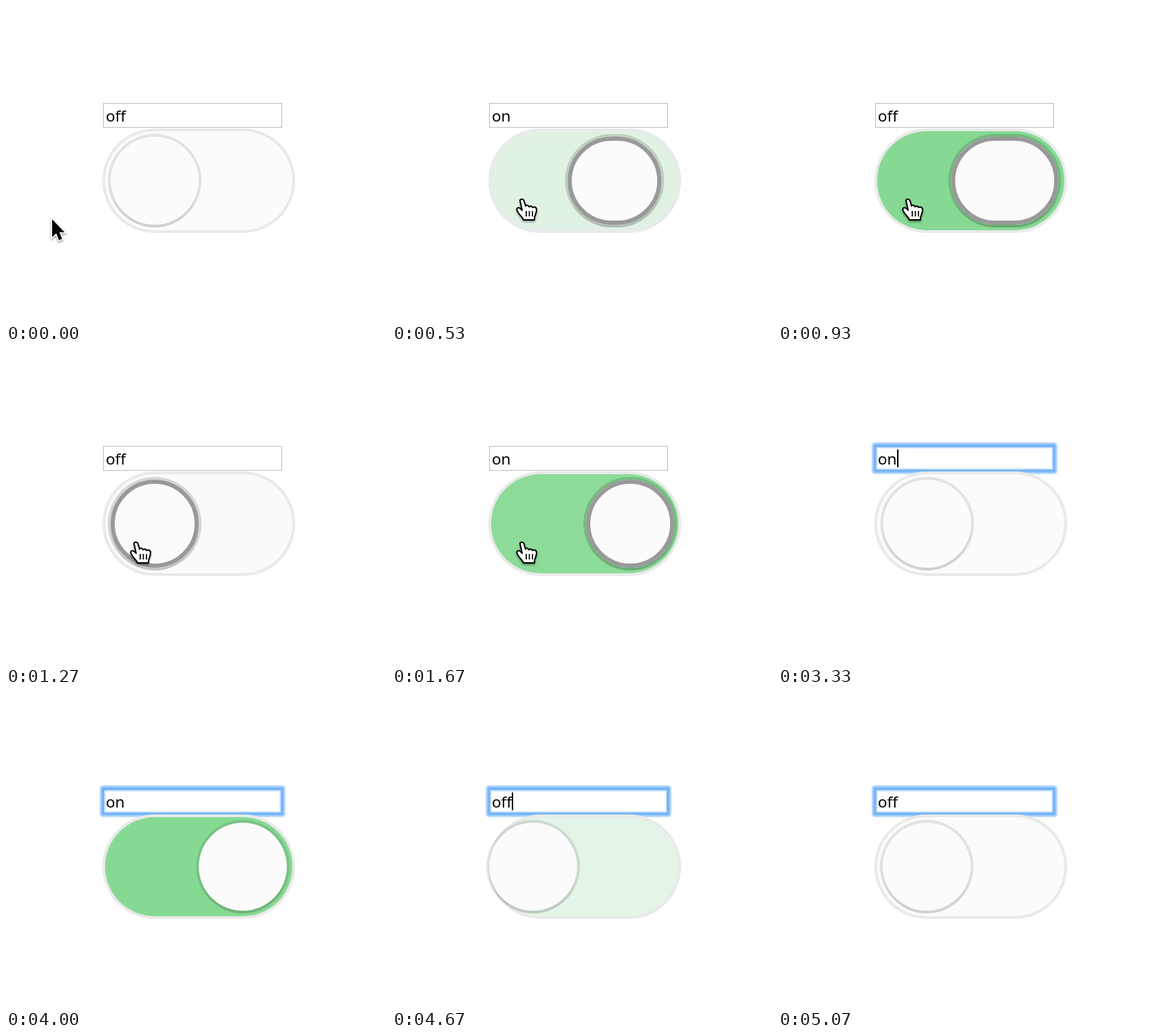
Animation, 552 px wide and 458 px high, one loop 5190 ms. Source, as an HTML page:

```html
<!DOCTYPE html>
<html>
<head>
<meta charset="utf-8">
<title>Toggle</title>
<style>
html, body { margin: 0; width: 100%; height: 100%; overflow: hidden; background: #fff; }
svg { display: block; width: 552px; height: 458px; }
text { font: 22.5px "Noto Sans", "Open Sans", sans-serif; font-variant-ligatures: none; white-space: pre; }
.cursor { filter: drop-shadow(0 2px 1.5px rgba(0, 0, 0, .4)); }
</style>
</head>
<body>
<svg viewBox="0 0 552 458">
  <defs>
    <clipPath id="inside"><rect x="144" y="182" width="272" height="144" rx="72"/></clipPath>
  </defs>
  <rect x="141.5" y="141.5" width="259" height="35" fill="#fff" stroke="#bcbcbc"/>
  <g id="focus">
    <rect x="136" y="135.5" width="270" height="46.5" rx="5" fill="#bcdafb"/>
    <rect x="138" y="137.5" width="266" height="42.5" rx="3" fill="#8fc3fa"/>
    <rect x="140" y="139.5" width="262" height="38.5" rx="1" fill="#6cb0f7"/>
    <rect x="142.5" y="142.5" width="257" height="33" fill="#c3dffb"/>
    <rect x="144.5" y="144.5" width="253" height="29" fill="#fff"/>
  </g>
  <text id="label" x="145" y="168"></text>
  <rect id="caret" y="146" width="2" height="26"/>

  <rect x="140" y="178" width="280" height="152" rx="76" fill="#e8eae9"/>
  <rect id="track" x="144" y="182" width="272" height="144" rx="72"/>
  <rect id="press" x="144" y="182" width="272" height="144" rx="72" fill="none" stroke="#e8eae9" clip-path="url(#inside)"/>
  <rect id="drop" y="194" height="128" rx="64" fill-opacity=".08"/>
  <rect id="halo" y="186" height="136" rx="68"/>
  <rect id="knob" y="190" height="128" rx="64" fill="#fbfbfb"/>
  <rect id="ring" y="193" height="122" rx="61" fill="none" stroke="#999" stroke-width="6"/>

  <g id="arrow" class="cursor">
    <path d="M1 1V27L7 21.500L11 31.500L15.500 29.500L11.500 20H19Z" stroke="#fff" stroke-width="3" paint-order="stroke"/>
  </g>
  <g id="hand" class="cursor">
    <path d="M-2 2C-2 -1 3 -1 4 3L6 10C7 8 10 8 11 11C13 9 15.500 10 16 12C18 10.500 22 11 22 15C22 20 20 23 19 26V30H3C2 26 -4 22 -6 17C-8 13 -5 11 -2 13L1 16Z" fill="#fff" stroke="#000" stroke-width="2" stroke-linejoin="round"/>
    <path d="M7 17V25M11.500 17V25M16 17V25" stroke="#000" stroke-width="1.700" fill="none"/>
  </g>
  <g id="beam">
    <path d="M-4 -15Q0 -15 0 -11V11Q0 15 -4 15M4 -15Q0 -15 0 -11M0 11Q0 15 4 15M-3 5H3" fill="none" stroke="#000" stroke-width="1.800"/>
  </g>
</svg>
<script>
const LOOP = 5190, STEP = 1000 / 15, STRETCH = 51.2;
const $ = id => document.getElementById(id);
const set = (id, attrs) => { for (const k in attrs) $(id).setAttribute(k, attrs[k]); };
const show = (id, on) => set(id, { visibility: on ? 'visible' : 'hidden' });
const clamp = v => Math.min(1, Math.max(0, v));
const mix = (a, b, p) => a + (b - a) * p;

function bezier(x1, y1, x2, y2) {
  const at = (a, b, s) => 3 * (1 - s) * (1 - s) * s * a + 3 * (1 - s) * s * s * b + s * s * s;
  return x => {
    if (x <= 0) return 0;
    if (x >= 1) return 1;
    let lo = 0, hi = 1;
    for (let i = 0; i < 30; i++) {
      const mid = (lo + hi) / 2;
      if (at(x1, x2, mid) < x) lo = mid; else hi = mid;
    }
    return at(y1, y2, lo);
  };
}
const ease = bezier(.25, .1, .25, 1);
const back = bezier(.175, .885, .32, 1.275);
const glide = bezier(.42, 0, .58, 1);

// Moments the switch flips; the first four are mouse clicks.
const flips = [465, 933, 1379, 1870, 3333, 4467];
const HOLD = 95, CLICKS = 4;

// Field contents over time
const edits = [
  [0, 'off'], [465, 'on'], [933, 'off'], [1379, 'on'], [1870, 'off'],
  [2730, 'of'], [2865, 'o'], [3330, 'on'],
  [4195, 'o'], [4330, 'of'], [4465, 'off']
];
const FOCUS = 2530, HIDE = 2730;

// Pointer stops: time, x, y
const stops = [[70, 66, 309], [330, 188, 281], [1900, 188, 281], [2133, 194.5, 214.5], [2400, 205, 146]];

function pointer(t) {
  let [, x, y] = stops[0];
  for (let i = 1; i < stops.length; i++) {
    const a = stops[i - 1], b = stops[i];
    if (t < a[0]) break;
    const p = glide(clamp((t - a[0]) / (b[0] - a[0])));
    x = mix(a[1], b[1], p);
    y = mix(a[2], b[2], p);
  }
  return { x, y };
}

// Press amount: rises while held, then returns in proportionally less time
function pressed(t, up, span) {
  const down = up - HOLD;
  if (t < down) return 0;
  if (t < up) return ease((t - down) / span);
  const top = ease(HOLD / span);
  return top * (1 - ease((t - up) / (span * top)));
}

function drawSwitch(t, hover) {
  const n = flips.filter(f => f <= t).length;
  const on = n % 2;
  const since = n ? t - flips[n - 1] : 1e4;
  const slide = on ? back(since / 300) : 1 - back(since / 300);
  const tint = on ? ease(since / 400) : 1 - ease(since / 400);

  let pad = 0, margin = 0, inset = 0;
  flips.slice(0, CLICKS).forEach((up, i) => {
    const s = pressed(t, up, 300) * STRETCH;
    pad += s;
    if (i % 2) margin += s;
    else inset += pressed(t, up, 400);
  });

  const x = 152 + 128 * slide - margin, w = 128 + pad;
  const rgb = [[251, 134], [251, 217], [251, 147]].map(c => Math.round(mix(c[0], c[1], tint)));
  set('track', { fill: `rgb(${rgb})` });
  set('press', { 'stroke-width': 256 * inset, 'stroke-opacity': inset });
  set('drop', { x, width: w });
  set('halo', { x: x - 4, width: w + 8, 'fill-opacity': hover ? .15 : .1 });
  set('knob', { x, width: w });
  set('ring', { x: x + 3, width: w - 6 });
  show('ring', hover);
}

function drawField(t) {
  const [since, word] = edits.filter(e => e[0] <= t).pop();
  const label = $('label');
  if (label.textContent !== word) label.textContent = word;
  const focused = t >= FOCUS;
  show('focus', focused);
  show('caret', focused && t - Math.max(since, FOCUS) < 580);
  set('caret', { x: Math.round(145 + label.getComputedTextLength()) });
}

function drawPointer(t, p, hover) {
  const kind = t >= HIDE ? '' : hover ? 'hand' : p.y < 178 ? 'beam' : 'arrow';
  for (const id of ['arrow', 'hand', 'beam']) show(id, id === kind);
  if (kind) set(kind, { transform: `translate(${p.x} ${p.y})` });
}

function render(ms) {
  const t = Math.floor((ms + 5) / STEP) * STEP;
  const p = pointer(t);
  const hover = t < HIDE && p.x > 146 && p.y > 178;
  drawField(t);
  drawSwitch(t, hover);
  drawPointer(t, p, hover);
}

const start = performance.now();
function tick() {
  render((performance.now() - start) % LOOP);
  requestAnimationFrame(tick);
}
tick();
</script>
</body>
</html>
```
